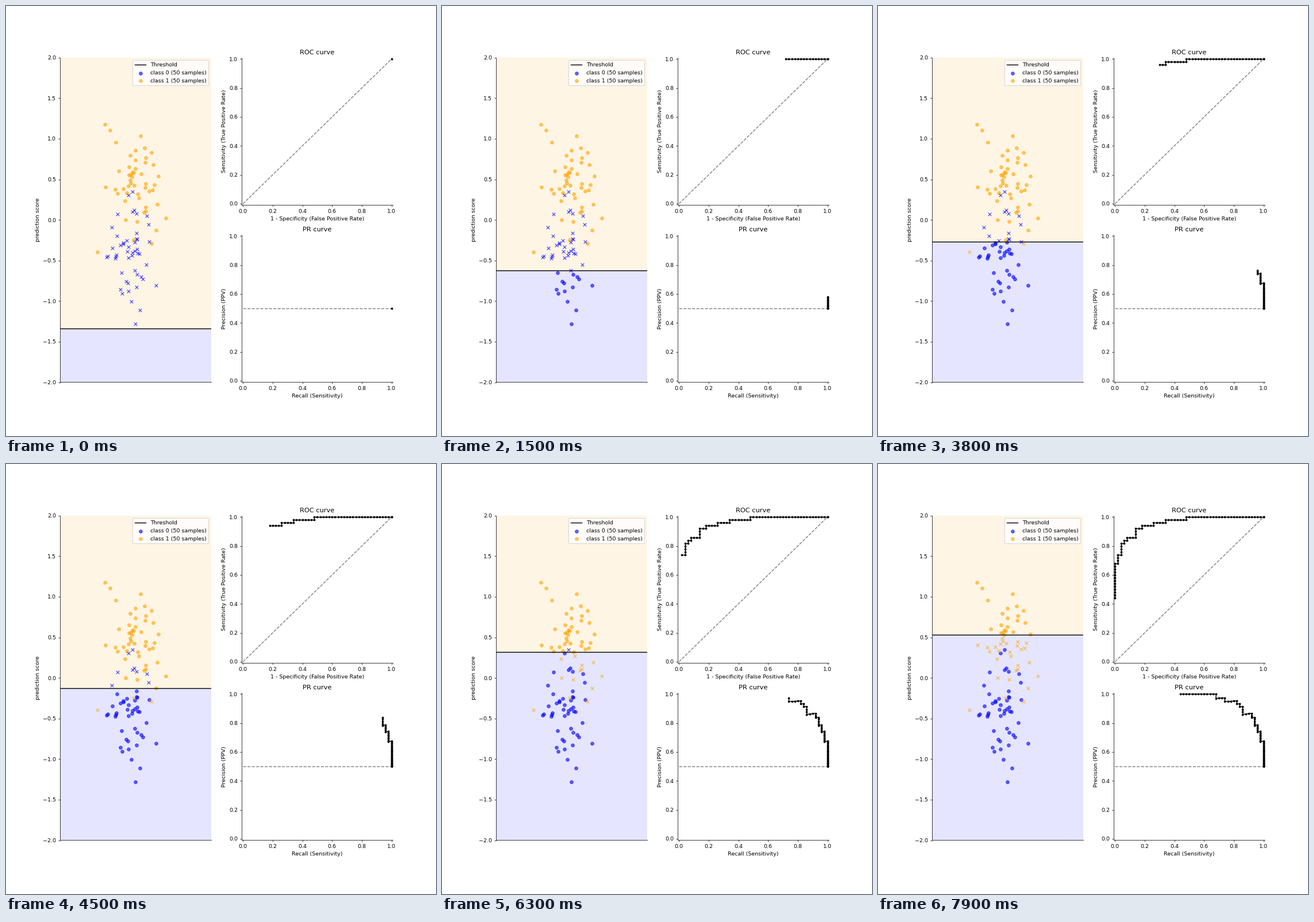
Write a matplotlib script that moves like this. It is 748 by 748 pixels and loops after 8000 ms.

```python
import numpy as np
import matplotlib.pyplot as plt
from matplotlib.animation import FuncAnimation

SIZE, DPI = 748, 68
FRAMES, INTERVAL = 80, 100

plt.rcParams.update({
    "font.family": "DejaVu Sans",
    "font.size": 10,
    "axes.spines.top": False,
    "axes.spines.right": False,
})

# Alternating runs of class 0 and class 1, from the lowest score to the highest
RUNS = [26, 1, 7, 1, 4, 1, 4, 1, 2, 3, 3, 1, 1, 1, 1, 4, 1, 3, 1, 34]
labels = np.repeat(np.arange(len(RUNS)) % 2, RUNS)

# Scores follow a quantile curve through a few (rank, score) knots
KNOTS = [(0, -1.284), (1, -1.11), (3, -0.904), (9, -0.755), (14, -0.622),
         (16, -0.477), (28, -0.38), (33, -0.295), (41, -0.235), (47, -0.023),
         (51, 0.073), (56, 0.119), (61, 0.307), (76, 0.455), (78, 0.53),
         (85, 0.6), (91, 0.767), (95, 0.887), (99, 1.178)]
scores = np.interp(np.arange(len(labels)), *zip(*KNOTS))
jitter = np.random.default_rng(7).normal(0, 0.2, len(labels))
points = np.column_stack([jitter, scores])

# The threshold starts below every score, then steps from sample to sample
thresholds = np.concatenate([[scores[0] - 0.055], scores])[:FRAMES]

accepted = scores >= thresholds[:, None]
tp = (accepted & (labels == 1)).sum(axis=1)
fp = (accepted & (labels == 0)).sum(axis=1)
tpr, fpr = tp / (labels == 1).sum(), fp / (labels == 0).sum()
precision = tp / (tp + fp)

fig = plt.figure(figsize=(SIZE / DPI, SIZE / DPI), dpi=DPI, facecolor="white")
grid = fig.add_gridspec(2, 2, left=0.125, right=0.9, bottom=0.125, top=0.88,
                        wspace=0.2, hspace=0.2)

# Score panel
ax = fig.add_subplot(grid[:, 0])
ax.set(xlim=(-1, 1), ylim=(-2, 2), xticks=[], ylabel="prediction score")
above = ax.axhspan(0, 2, color="orange", alpha=0.1, lw=0, zorder=0.5)
below = ax.axhspan(-2, 0, color="blue", alpha=0.1, lw=0, zorder=0.5)
line = ax.axhline(0, color="black", label="Threshold")


def cloud(color, marker, label=None):
    return ax.scatter([], [], color=color, marker=marker, alpha=0.6, label=label)


hits = [cloud("blue", "o", "class 0 (50 samples)"),
        cloud("orange", "o", "class 1 (50 samples)")]
misses = [cloud("blue", "x"), cloud("orange", "x")]
ax.legend(handles=[line, *hits], loc="upper right")


def curve_panel(cell, title, xlabel, ylabel, baseline):
    panel = fig.add_subplot(cell)
    panel.set(xlim=(-0.01, 1.01), ylim=(-0.01, 1.01),
              title=title, xlabel=xlabel, ylabel=ylabel)
    panel.plot([0, 1], baseline, "--", color="gray")
    return panel.plot([], [], ".-", color="black")[0]


roc = curve_panel(grid[0, 1], "ROC curve", "1 - Specificity (False Positive Rate)",
                  "Sensitivity (True Positive Rate)", [0, 1])
pr = curve_panel(grid[1, 1], "PR curve", "Recall (Sensitivity)",
                 "Precision (PPV)", [0.5, 0.5])


def update(i):
    t = thresholds[i]
    line.set_ydata([t, t])
    above.set_y(t)
    above.set_height(2 - t)
    below.set_height(t + 2)
    correct = accepted[i] == labels
    for k in (0, 1):
        hits[k].set_offsets(points[(labels == k) & correct])
        misses[k].set_offsets(points[(labels == k) & ~correct])
    roc.set_data(fpr[:i + 1], tpr[:i + 1])
    pr.set_data(tpr[:i + 1], precision[:i + 1])


anim = FuncAnimation(fig, update, frames=FRAMES, interval=INTERVAL,
                     repeat=True, repeat_delay=0)
plt.show()
```
